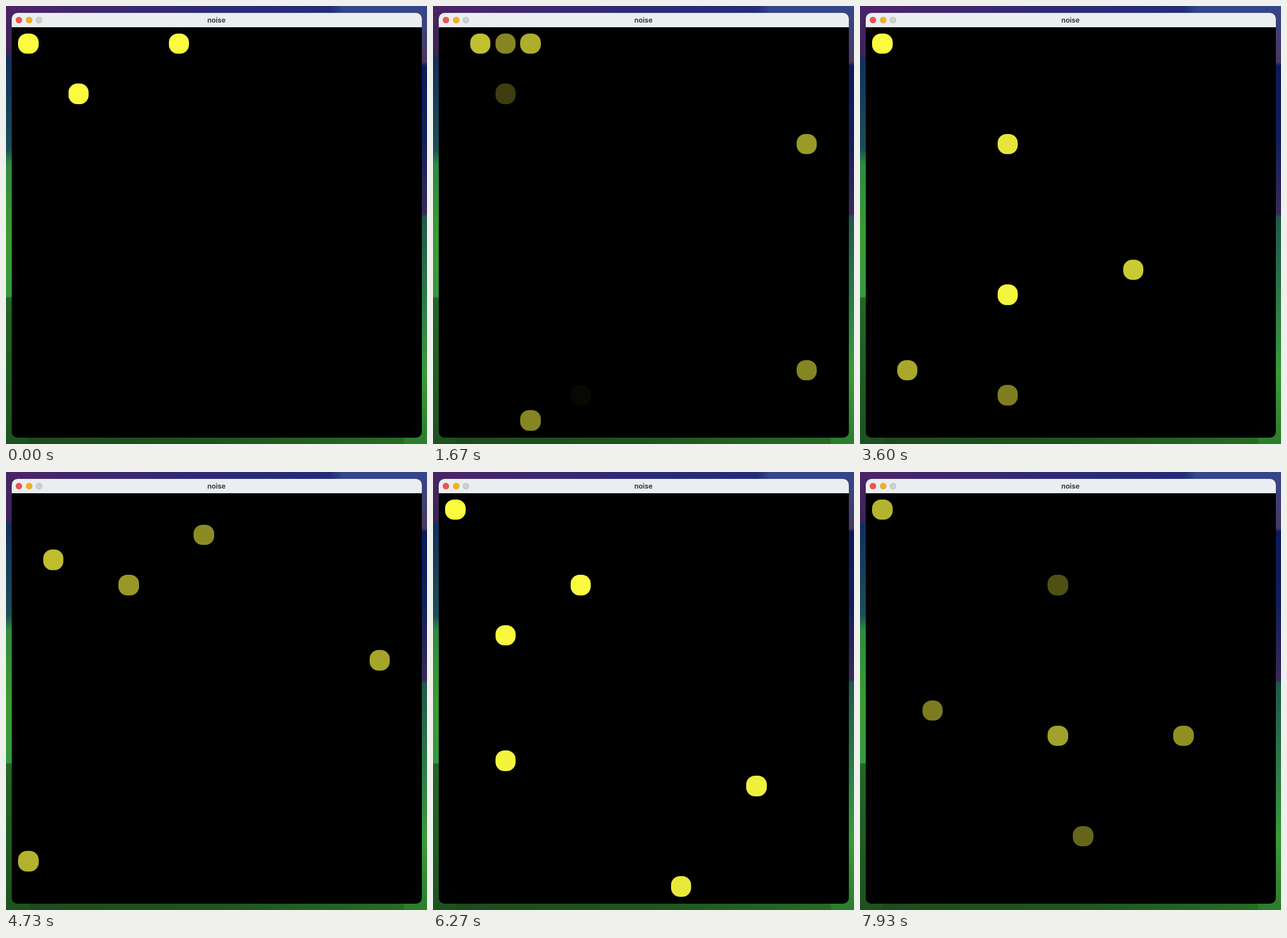
An HTML page that plays this animation: 734 px wide and 763 px high, repeating every 8000 ms.

```html
<!DOCTYPE html>
<html lang="en">
<head>
<meta charset="utf-8">
<title>noise</title>
<style>
  html, body { margin: 0; width: 100%; height: 100%; overflow: hidden; background: #1f5a22; }
  #stage { position: relative; width: 734px; height: 763px; overflow: hidden; }
  .edge { position: absolute; }
  .left, .right { top: 0; width: 40px; height: 763px; }
  .top, .bottom { left: 0; width: 734px; height: 20px; }
  .left { left: 0; background: linear-gradient(#4b2468, #3b2454 85px, #10305c 92px, #1c4f58 250px, #2f8a40 275px, #3c9c30 400px, #359a40 506px, #236626 509px, #1d5220); }
  .right { right: 0; background: linear-gradient(#34468c, #4a3860 98px, #0a1a5a 104px, #101f5a 230px, #382a58 362px, #20584c 368px, #2c7c48 520px, #3a9a38 640px, #2c7c2c); }
  .top { top: 0; background: linear-gradient(90deg, #4c2468, #2c2a78 50%, #232c78 77%, #34468c 80%); }
  .bottom { bottom: 0; background: linear-gradient(90deg, #1d4a1e, #1f541f 50%, #286e26); }
  #window {
    position: absolute; left: 9.5px; top: 11.5px; width: 715px; height: 740px;
    border-radius: 10px; overflow: hidden; background: #000;
  }
  #bar {
    height: 25px; background: #eaeef0; color: #3c3d42;
    font: 700 12px/25px Inter, sans-serif; text-align: center;
  }
  .light {
    position: absolute; top: 7px; width: 11px; height: 11px; border-radius: 50%;
    box-shadow: inset 0 0 0 .5px rgba(0, 0, 0, .18);
  }
  .cell { position: absolute; width: 35.4px; height: 35.4px; border-radius: 15.5px; background: #fbfb40; opacity: 0; }
</style>
</head>
<body>
<div id="stage">
  <div class="edge top"></div>
  <div class="edge bottom"></div>
  <div class="edge left"></div>
  <div class="edge right"></div>
  <div id="window">
    <div id="bar">
      <i class="light" style="left:7.3px;background:#f4524b"></i>
      <i class="light" style="left:25.1px;background:#f5b01e"></i>
      <i class="light" style="left:42.8px;background:#cfcfd0"></i>
      noise
    </div>
  </div>
</div>
<script>
  const LOOP = 8000, STEP = 1000 / 15, FADE = 600;
  const LEFT = 21.2, TOP = 47.9, PITCH = 43.75;
  const HOME = [0, 0];

  // Each chord glows at its peak; every further cell runs ahead by gap ms.
  const chords = [
    { peak: 0, gap: 0, cells: [HOME, [6, 0], [2, 2]] },
    { peak: 1400, gap: 40, cells: [[1, 0], [3, 0], [14, 4], [2, 0], [3, 15], [14, 13], [2, 2]] },
    { peak: 2446, gap: 48, cells: [HOME, [4, 9], [14, 9], [11, 10], [5, 14], [3, 15], [14, 13]] },
    { peak: 3600, gap: 80, cells: [HOME, [5, 10], [5, 4], [10, 9], [1, 13], [5, 14]] },
    { peak: 5110, gap: 26, cells: [[7, 1], [4, 3], [14, 6], [0, 14], [1, 2]] },
    { peak: 6270, gap: 30, cells: [HOME, [5, 3], [2, 5], [2, 10], [12, 11], [9, 15]] },
    { peak: 7637, gap: 36, cells: [HOME, [7, 9], [12, 9], [2, 8], [8, 13], [7, 3]] }
  ];

  function addCell([col, row], peak) {
    const el = document.createElement('div');
    el.className = 'cell';
    el.style.left = LEFT + col * PITCH + 'px';
    el.style.top = TOP + row * PITCH + 'px';
    document.getElementById('stage').append(el);
    return { el, peak };
  }

  const pulses = chords.flatMap(({ peak, gap, cells }) =>
    cells.map((cell, i) => addCell(cell, peak - i * gap)));

  function glow(t) {
    const u = Math.min(1, Math.abs(t) / FADE);
    return Math.cos(u * Math.PI / 2);
  }

  const start = performance.now();
  function draw(now) {
    const elapsed = Math.max(0, now - start) % LOOP;
    const t = Math.floor((elapsed + 4) / STEP) * STEP;
    for (const { el, peak } of pulses) el.style.opacity = glow(t - peak).toFixed(3);
    requestAnimationFrame(draw);
  }
  draw(start);
</script>
</body>
</html>
```
